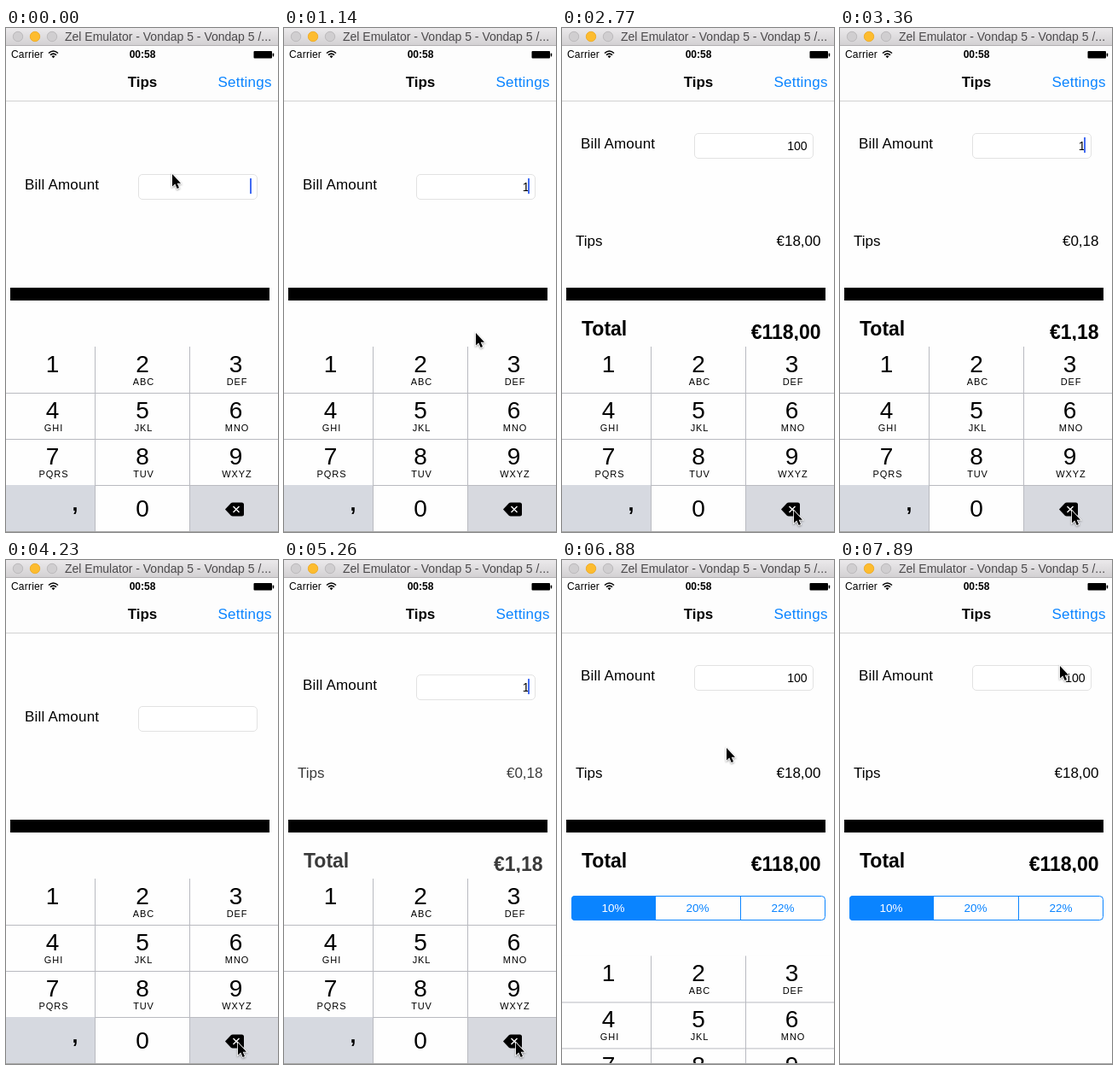
Recreate the animation shown at these times as an HTML page. Size 319 by 590 pixels, loop 8000 ms.

```html
<!DOCTYPE html>
<html lang="en">
<head>
<meta charset="utf-8">
<title>Tips</title>
<style>
html, body { margin: 0; width: 319px; height: 590px; overflow: hidden; background: #fefefe; }
svg { display: block; font: 17px "Liberation Sans", Arial, sans-serif; }
.bold { font-weight: bold; }
.mid { text-anchor: middle; }
.end { text-anchor: end; }
.blue { fill: #0a84ff; }
.wide { letter-spacing: .2px; }
.big { font-weight: bold; font-size: 23px; }
.digit { font-size: 28px; text-anchor: middle; }
.letters { font-size: 11px; letter-spacing: .9px; text-anchor: middle; }
.seg { font-size: 13.5px; text-anchor: middle; }
#mouse { stroke: #fff; stroke-width: 1.6px; paint-order: stroke; filter: drop-shadow(0 1px 1px #0006); }
</style>
</head>
<body>
<svg width="319" height="590" viewBox="0 0 319 590">
  <defs>
    <linearGradient id="chrome" x2="0" y2="1">
      <stop stop-color="#ebe9eb"/><stop offset="1" stop-color="#d3d1d3"/>
    </linearGradient>
  </defs>
  <rect width="319" height="590" fill="#fefefe"/>

  <!-- amount row -->
  <g id="bill">
    <text class="wide" x="22" y="189">Bill Amount</text>
    <rect x="155.5" y="171.5" width="139" height="29" rx="4.5" fill="#fff" stroke="#e2e2e2"/>
    <text id="amount" class="end" x="287.5" y="191" font-size="14"></text>
    <rect id="caret" x="286" y="176" width="2" height="18" fill="#426bf2"/>
  </g>

  <!-- results -->
  <g id="results">
    <text x="16" y="255">Tips</text>
    <text id="tip" class="end" x="303.5" y="255"></text>
    <text class="big" x="23" y="360">Total</text>
    <text id="total" class="big end" x="303.5" y="364"></text>
  </g>
  <rect y="366" width="319" height="8" fill="#fefefe"/>
  <rect x="5" y="304" width="304" height="15"/>

  <!-- percentage picker -->
  <rect x="11.5" y="393.5" width="297" height="28" rx="4" fill="#fefefe" stroke="#0a84ff"/>
  <path class="blue" d="M110 393H15a4 4 0 0 0-4 4v21a4 4 0 0 0 4 4h95z"/>
  <path d="M209.5 393v29" stroke="#0a84ff"/>
  <text class="seg" x="60" y="412" fill="#fff">10%</text>
  <text class="seg blue" x="159" y="412">20%</text>
  <text class="seg blue" x="259" y="412">22%</text>

  <!-- keypad -->
  <g id="pad">
    <rect y="373" width="319" height="217" fill="#fefefe"/>
    <rect y="535" width="104" height="55" fill="#d6d9e0"/>
    <rect id="del" x="215" y="535" width="104" height="55"/>
    <path d="M104.5 373V589M215.5 373V589M0 427.5H319M0 481.5H319M104 535.5H319" stroke="#b9bac0"/>
    <g id="keys"></g>
    <text class="bold mid" x="81" y="565" font-size="25">,</text>
    <path d="M257 563.5L263.5 556.500Q264.500 555.500 266 555.500H276.500Q279 555.500 279 558V569Q279 571.500 276.500 571.500H266Q264.500 571.500 263.500 570.500Z"/>
    <path d="M266.500 560l7 7m0-7l-7 7" stroke="#fff" stroke-width="1.4"/>
  </g>
  <path d="M0 589.5H319" stroke="#a8a8a8"/>

  <!-- status and navigation bars -->
  <rect y="21" width="319" height="64" fill="#fdfdfd"/>
  <path d="M0 85.5H319" stroke="#d2d2d2"/>
  <text class="wide" x="6" y="35" font-size="12">Carrier</text>
  <path d="M50 29.5Q55.5 24.5 61 29.5M52 31.7Q55.5 28.5 59 31.7" fill="none" stroke="#000" stroke-width="1.6"/>
  <path d="M53.5 33L55.5 35.2L57.5 33Q55.5 31.5 53.5 33Z"/>
  <text class="bold mid" x="160" y="35" font-size="12">00:58</text>
  <rect x="290.5" y="27" width="21.5" height="8.5" rx="1"/>
  <rect x="312.7" y="29.5" width="1.5" height="4" rx=".7"/>
  <text class="bold mid" x="160" y="69">Tips</text>
  <text class="blue wide end" x="311.6" y="69">Settings</text>

  <!-- window bar -->
  <rect width="319" height="20" fill="url(#chrome)"/>
  <path d="M0 20.5H319" stroke="#b3b1b3"/>
  <circle cx="14" cy="10" r="5.7" fill="#d0ced0" stroke="#bcbabc"/>
  <circle cx="34" cy="10" r="5.7" fill="#fdbc2f" stroke="#efae2b"/>
  <circle cx="54" cy="10" r="5.7" fill="#d0ced0" stroke="#bcbabc"/>
  <text x="69" y="15" font-size="14" fill="#4c4a4c">Zel Emulator - Vondap 5 - Vondap 5 /...</text>

  <path id="mouse" d="M0 0V14.5L3.3 11.5L5.7 17L8 16L5.7 10.7H10Z"/>
</svg>
<script>
const LOOP = 8000;
const FIRST = 1130, ERASE = 2910, SECOND = 4965, DISMISS = 6690;
const $ = id => document.getElementById(id);

function addKey(label, letters, x, y) {
  $("keys").innerHTML += `<text class="digit" x="${x}" y="${y}">${label}</text>
    <text class="letters" x="${x + 1.5}" y="${y + 15.5}">${letters}</text>`;
}
["", "ABC", "DEF", "GHI", "JKL", "MNO", "PQRS", "TUV", "WXYZ"].forEach((letters, i) =>
  addKey(i + 1, letters, 54.5 + 107.5 * (i % 3) - 2 * (i % 3 === 1), 402.5 + 54 * Math.floor(i / 3)));
addKey(0, "", 160, 572);

// Keystrokes, each with the text it leaves; the first one only sets the caret's rhythm
const enter = t => [[t, "1"], [t + 440, "10"], [t + 730, "100"]];
const erase = t => ["10", "1", ""].map((text, i) => [t + 300 * i, text]);
const strokes = [[-270, ""], ...enter(FIRST), ...erase(ERASE), ...enter(SECOND)];

// Pointer moves: start, end, x, y
const start = [195, 171];
const moves = [
  [110, 730, 225, 357], [2250, 2760, 272, 565], [6230, 6440, 193, 220],
  [7180, 7740, 244, 134], [7780, 7890, 258, 124]
];

function ramp(t, from, to) {
  const p = Math.min(1, Math.max(0, (t - from) / (to - from)));
  return p * p * (3 - 2 * p);
}
const pointer = t => moves.reduce(([x, y], [from, to, toX, toY]) => {
  const p = ramp(t, from, to);
  return [x + (toX - x) * p, y + (toY - y) * p];
}, start);
const slide = (t, from) => ramp(t, from, from + 430);
const euro = n => "€" + n.toFixed(2).replace(".", ",");
const shift = (id, x, y) => $(id).setAttribute("transform", `translate(${x} ${y})`);

function draw(now) {
  const t = now % LOOP;
  const [last, text] = strokes.filter(([time]) => time <= t).pop();
  const since = t - last, bill = Number(text);
  const raised = slide(t, FIRST + 20) - slide(t, ERASE + 600) + slide(t, SECOND);
  const caretOn = since % 1000 < 600 && t < DISMISS;
  const pressed = last >= ERASE && last < SECOND && since < 140;

  shift("bill", 0, -48 * raised);
  shift("pad", 0, 217 * slide(t, DISMISS));
  shift("mouse", ...pointer(t));
  $("amount").textContent = text;
  $("tip").textContent = euro(bill * .18);
  $("total").textContent = euro(bill * 1.18);
  $("results").setAttribute("opacity", raised);
  $("caret").setAttribute("opacity", Number(caretOn));
  $("del").setAttribute("fill", pressed ? "#fefefe" : "#d7d9df");
  requestAnimationFrame(draw);
}
draw(0);
</script>
</body>
</html>
```
